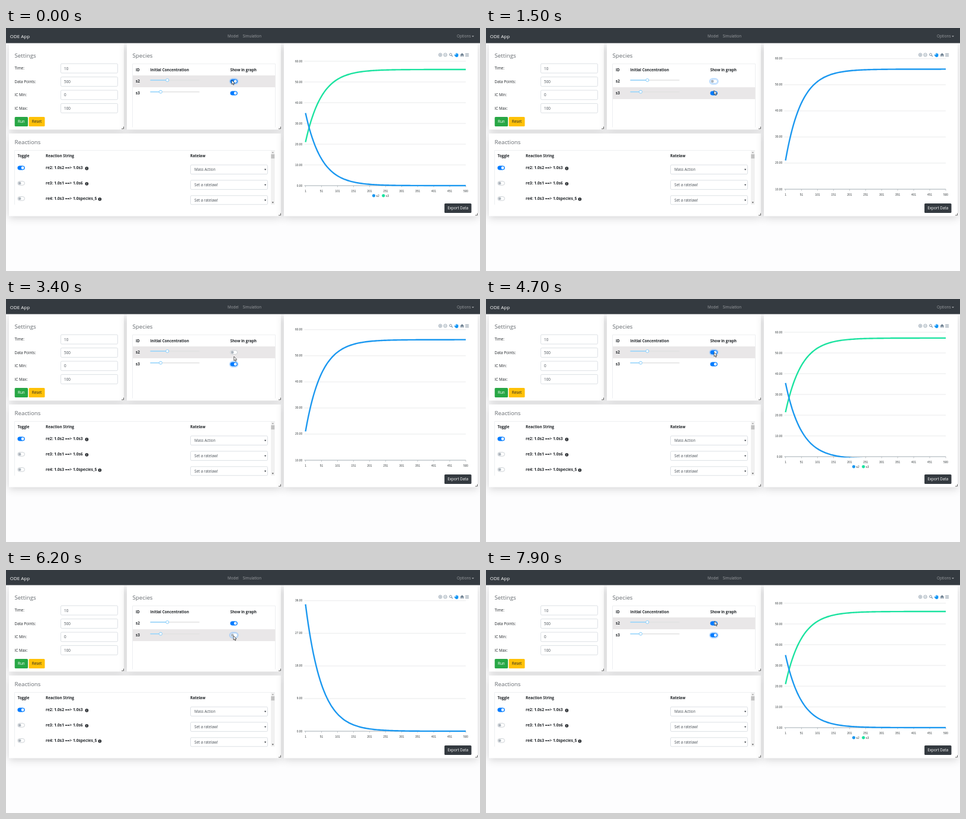
Recreate the animation shown at these times as an HTML page. Size 800 by 410 pixels, loop 8 s.

```html
<!DOCTYPE html>
<html lang="en">
<head>
<meta charset="utf-8">
<title>ODE App</title>
<style>
  html, body { margin: 0; width: 100%; height: 100%; overflow: hidden; background: #fdfdfe; }
  svg { display: block; width: 800px; height: 410px; }
  text { font: 6.35px "Open Sans", "Noto Sans", sans-serif; fill: #212529; white-space: pre; }
  .b { font-weight: 700; font-size: 6.3px; }
  .re { font-weight: 700; font-size: 6.7px; }
  .h { font-weight: 500; font-size: 9.75px; fill: #666b70; }
  .brand { font-size: 8px; fill: #fff; }
  .nav { fill: #9a9da0; }
  .field { fill: #495057; }
  .white { fill: #fff; }
  .num { font: 4.9px "Liberation Sans", Arial, sans-serif; fill: #373d3f; }
  .card { fill: #fff; filter: drop-shadow(0 3px 6.7px rgba(0, 0, 0, .16)); }
</style>
</head>
<body>
<svg id="stage" viewBox="0 0 800 410"></svg>
<script>
const NS = 'http://www.w3.org/2000/svg';
const LOOP = 8000;
const BLUE = '#1b98f0', GREEN = '#1be3a0';
const stage = document.getElementById('stage');

function el(tag, attrs, parent = stage) {
  const node = document.createElementNS(NS, tag);
  set(node, attrs);
  parent.appendChild(node);
  return node;
}
function set(node, attrs) {
  for (const k in attrs) node.setAttribute(k, attrs[k]);
}
const rect = (x, y, width, height, fill, more, parent) =>
  el('rect', { x, y, width, height, fill, ...more }, parent);
const line = (x1, y1, x2, y2, stroke, w = 1, parent) =>
  el('line', { x1, y1, x2, y2, stroke, 'stroke-width': w }, parent);
const circle = (cx, cy, r, fill, more, parent) =>
  el('circle', { cx, cy, r, fill, ...more }, parent);
const path = (d, more, parent) => el('path', { d, fill: 'none', ...more }, parent);
function text(x, y, str, cls = '', anchor = 'start', parent) {
  el('text', { x, y, class: cls, 'text-anchor': anchor }, parent).textContent = str;
}

function card(x, y, w, h, title) {
  rect(x, y, w, h, '#fff', { class: 'card' });
  if (title) text(x + 9.5, y + (y > 100 ? 18 : 24), title, 'h');
  path(`M${x + w - 4} ${y + h - 1.5}h3.5v-3.5`, { stroke: '#555', 'stroke-width': .9 });
}
function button(x, y, w, h, fill, label, cls) {
  rect(x, y, w, h, fill, { rx: 1.6 });
  text(x + w / 2, y + h / 2 + 2.3, label, cls, 'middle');
}
function box(x, y, w, h) {
  rect(x, y, w, h, '#fff', { rx: 1.7, stroke: '#ced4da', 'stroke-width': .7 });
}

// Switch: returns a function that poses it (on: 0..1)
function toggle(x, y) {
  const ring = rect(x - 1.3, y - 4.7, 14.4, 9.4, 'none', { rx: 4.7, stroke: '#80bdff', 'stroke-opacity': .55, 'stroke-width': 1.5 });
  const track = rect(x, y - 3.3, 11.8, 6.6, '#fff', { rx: 3.3, 'stroke-width': .6 });
  const knob = circle(0, y, 2.4);
  return (on, focus) => {
    const mix = (a, b) => a.map((v, i) => Math.round(v + (b[i] - v) * on));
    const edge = focus ? [128, 189, 255] : [173, 181, 189];
    set(ring, { visibility: focus ? 'visible' : 'hidden' });
    set(track, { fill: `rgb(${mix([255, 255, 255], [0, 123, 255])})`, stroke: `rgb(${mix(edge, [0, 123, 255])})` });
    set(knob, { cx: x + 3.4 + 5 * on, fill: `rgb(${mix([173, 181, 189], [255, 255, 255])})` });
  };
}
function slider(y, at) {
  line(243.5, y, 326.5, y, '#e2e2e2', 1.5);
  line(243.5, y, at, y, '#91d5ff', 1.5);
  circle(at, y, 2.5, '#fff', { stroke: '#7cc9fb', 'stroke-width': .9 });
}

// Cards
card(5, 26, 194, 145.5, 'Settings');
card(204, 26, 260, 145.5, 'Species');
card(5, 178, 459, 139.5, 'Reactions');
card(469, 26, 327, 291.5);

// Navigation bar
rect(0, 0, 800, 25.5, '#343a40');
text(6.7, 17, 'ODE App', 'brand');
text(374, 16.3, 'Model', 'nav');
text(399.5, 16.3, 'Simulation', 'nav');
text(761, 16.3, 'Options', 'nav');
path('M786 13h4l-2 2.2z', { fill: '#9a9da0' });

// Settings
[['Time:', 10], ['Data Points:', 500], ['IC Min:', 0], ['IC Max:', 100]].forEach(([name, value], i) => {
  const y = 68.2 + i * 22.4;
  text(14.6, y + 2.2, name);
  box(92.5, y - 8, 96, 15.8);
  text(98, y + 2.4, value, 'field');
});
button(14.7, 150, 22.3, 16, '#28a745', 'Run', 'white');
button(38.5, 150, 27, 16, '#ffc107', 'Reset');

// Species
path('M213.5 167.5V60.5H454.5V167.5', { stroke: '#e9ebee', 'stroke-width': .8 });
const hover = rect(214, 80, 240.5, 20, '#e9e7e8');
[[219, 'ID'], [243.5, 'Initial Concentration'], [378.5, 'Show in graph']].forEach(([x, s]) => text(x, 72.5, s, 'b'));
text(219, 92.3, 's2', 'b');
text(219, 112.3, 's3', 'b');
slider(88, 272.3);
slider(107.7, 261);
const switches = [toggle(378.7, 90), toggle(378.7, 110)];

// Reactions
path('M14.5 298V206.5H454', { stroke: '#e9ebee', 'stroke-width': .8 });
[[19.5, 'Toggle'], [67, 'Reaction String'], [311, 'Ratelaw']].forEach(([x, s]) => text(x, 218.3, s, 'b'));
[
  ['re2: 1.0s2 ==> 1.0s3', 136.3, 'Mass Action'],
  ['re3: 1.0s1 ==> 1.0s6', 136.3, 'Set a ratelaw!'],
  ['re4: 1.0s3 ==> 1.0species_5', 158.3, 'Set a ratelaw!']
].forEach(([name, infoX, law], i) => {
  const y = 236 + i * 25.9;
  toggle(19.7, y)(i ? 0 : 1, false);
  text(67, y + 2.4, name, 're');
  circle(infoX, y + .9, 2.8, '#212529');
  path(`M${infoX} ${y - .9}v.9m0 .5v2`, { stroke: '#fff', 'stroke-width': .9 });
  box(311.5, y - 5, 130, i < 2 ? 15.5 : 15);
  text(318, y + 5.4, law, 'field');
  path(`M436 ${y + 1.8}h3.2l-1.6 2.4z`, { fill: '#343a40' });
});
rect(447, 206.5, 6.7, 91.5, '#f1f1f1');
rect(447.4, 213, 5.8, 7.2, '#c1c1c1');
path('M448.7 211l1.6-2.2 1.6 2.2z', { fill: '#a3a3a3' });
path('M448.7 293.5l1.6 2.2 1.6-2.2z', { fill: '#505050' });

// Chart axes
const POINTS = ['1', '51', '101', '151', '201', '251', '301', '351', '401', '451', '500'];
const TIMES = POINTS.map((_, i) => (1 + i * .9).toFixed(1));
const AXES = {
  both: { top: 56, bottom: 266, min: 0, max: 60, rows: 6, left: 505.5, labels: POINTS },
  s3: { top: 51.8, bottom: 272, min: 10, max: 60, rows: 5, left: 505.5, labels: POINTS },
  s2: { top: 51.8, bottom: 272, min: 0, max: 36, rows: 4, left: 505.5, labels: POINTS },
  none: { top: 51.8, bottom: 272, min: 0, max: 5, rows: 5, left: 503, labels: TIMES }
};
const RIGHT = 776;
const clip = rect(500, 0, 281, 0, '#fff', {}, el('clipPath', { id: 'plot' }));

function drawAxes(name) {
  const a = AXES[name];
  const g = el('g', { visibility: 'hidden' });
  for (let i = 0; i <= a.rows; i++) {
    const f = i / a.rows, y = a.bottom + (a.top - a.bottom) * f;
    line(a.left - 2, y, RIGHT, y, i ? '#e4e5e6' : '#8b989f', .8, g);
    text(a.left - 5.2, y + 1.5, (a.min + (a.max - a.min) * f).toFixed(2), 'num', 'end', g);
  }
  a.labels.forEach((s, i) => {
    const x = a.left + (RIGHT - a.left) * i / 10;
    line(x, a.bottom, x, a.bottom + 2.6, '#a9b1b6', .7, g);
    text(x, a.bottom + 10.8, s, 'num', 'middle', g);
  });
  if (name === 'both') {
    circle(620.7, 282.8, 2.6, BLUE, {}, g);
    text(624.8, 284.6, 's2', 'num', 'start', g);
    circle(637, 282.8, 2.6, GREEN, {}, g);
    text(641, 284.6, 's3', 'num', 'start', g);
  }
  if (name !== 'none') drawTools(g);
  return g;
}
function drawTools(g) {
  const ink = { stroke: '#6e8192', 'stroke-width': .7 };
  circle(733, 45.3, 2.7, 'none', ink, g);
  path('M731.6 45.3h2.8m-1.4-1.4v2.8', ink, g);
  circle(741.4, 45.3, 2.7, 'none', ink, g);
  path('M740 45.3h2.8', ink, g);
  circle(750.4, 44.7, 1.9, 'none', { ...ink, 'stroke-width': .9 }, g);
  path('M751.8 46.1l2 2', { ...ink, 'stroke-width': 1.1 }, g);
  path('M758.2 45.8l-1.3-.8 1.7 3 1 .6h2.4l.9-1.4v-3.6m-1.3 1.6v-2.5m-1.2 2.4v-2.9m-1.3 3v-2.4', { stroke: '#0b92f5', fill: '#0b92f5', 'stroke-width': .9 }, g);
  path('M766.4 45.5l3.4-3.2 3.4 3.2h-1v2.7h-1.7v-2h-1.4v2h-1.7v-2.7z', { fill: '#6e8192' }, g);
  path('M775.2 43.3h6m-6 2.1h6m-6 2.1h6', { stroke: '#6e8192', 'stroke-width': .8 }, g);
}
const axes = {};
for (const name in AXES) axes[name] = drawAxes(name);

const plot = el('g', { 'clip-path': 'url(#plot)' });
const curves = [GREEN, BLUE].map(stroke => path('', { stroke, 'stroke-width': 2.4 }, plot)).reverse();

button(740, 296, 45.5, 16, '#343a40', 'Export Data', 'white');

const cursor = path('M0 0v7l1.6-1.4 1.1 2.5 1.2-.5-1.1-2.5h2.2z', { fill: '#fff', stroke: '#222', 'stroke-width': .7, 'stroke-linejoin': 'round' });

// Each curve is a pair [first y, last y]; it decays exponentially between them
function ends(axis, first, last) {
  const a = AXES[axis];
  return [first, last].map(v => a.bottom - (v - a.min) / (a.max - a.min) * (a.bottom - a.top));
}
const S2 = ends('both', 35, 0), S3 = ends('both', 21, 56);
const S2_ONLY = ends('s2', 35, 0), S3_ONLY = ends('s3', 21, 56);
const FLOOR = [266, 266], LOW_FLOOR = [272, 272];

// Chart states: start time, axes, curves as [from, to]
const STATES = [
  [-LOOP, 'both', [S2, S2], [S3, S3]],
  [265, 's3', [S2, S3_ONLY]],
  [1820, 'none'],
  [2640, 's3', [LOW_FLOOR, S3_ONLY]],
  [4000, 'both', [S3_ONLY, S2], [FLOOR, S3]],
  [5400, 's2', [S2, S2_ONLY]],
  [6520, 'both', [S2_ONLY, S2], [FLOOR, S3]]
];
const SWITCHING = [
  [[-LOOP, 1], [180, 0], [3950, 1]],
  [[-LOOP, 1], [1740, 0], [2620, 1], [5350, 0], [6470, 1]]
];
const FOCUS = [[0, 0], [1740, 1], [3950, 0], [5350, 1]];
const POINTER = [
  [0, 381, 88], [400, 384, 88.5], [1200, 384, 88.5], [1600, 385, 108.5], [3100, 385, 108.5],
  [3400, 384.7, 97], [3650, 385, 90], [4900, 385, 90], [5250, 384, 111], [6850, 384, 111],
  [7250, 386, 86.5], [LOOP, 386, 86.5]
];

const latest = (list, t) => list.filter(s => s[0] <= t).pop();
const ease = (k) => k * k * (3 - 2 * k);
function backOut(k) {
  const x = Math.min(k, 1) - 1;
  return x * x * (2.70158 * x + 1.70158) + 1;
}
function curvePath([from, to], p, left) {
  const [a, b] = from.map((v, i) => v + (to[i] - v) * p);
  let d = '';
  for (let i = 0; i <= 120; i++) {
    const u = i / 120;
    d += `${i ? 'L' : 'M'}${(left + (RIGHT - left) * u).toFixed(2)} ${(b + (a - b) * Math.exp(-10 * u)).toFixed(2)}`;
  }
  return d;
}

function render(t) {
  const [start, name, ...lines] = latest(STATES, t);
  const a = AXES[name], p = backOut((t - start) / 800);
  for (const n in axes) set(axes[n], { visibility: n === name ? 'visible' : 'hidden' });
  set(clip, { y: a.top - 3, height: a.bottom - a.top + 4.5 });
  curves.forEach((c, i) => set(c, { d: lines[i] ? curvePath(lines[i], p, a.left) : '' }));

  const focused = latest(FOCUS, t)[1];
  switches.forEach((pose, i) => {
    const [at, on] = latest(SWITCHING[i], t);
    const k = ease(Math.min((t - at) / 150, 1));
    pose(on ? k : 1 - k, focused === i);
  });

  const i = Math.max(1, POINTER.findIndex(s => s[0] > t));
  const [t0, x0, y0] = POINTER[i - 1], [t1, x1, y1] = POINTER[i];
  const k = ease((t - t0) / (t1 - t0));
  const x = x0 + (x1 - x0) * k, y = y0 + (y1 - y0) * k;
  set(cursor, { transform: `translate(${x} ${y})` });
  set(hover, { y: y < 100 ? 80 : 100 });
}

function tick() {
  render(performance.now() % LOOP);
  requestAnimationFrame(tick);
}
tick();
</script>
</body>
</html>
```
